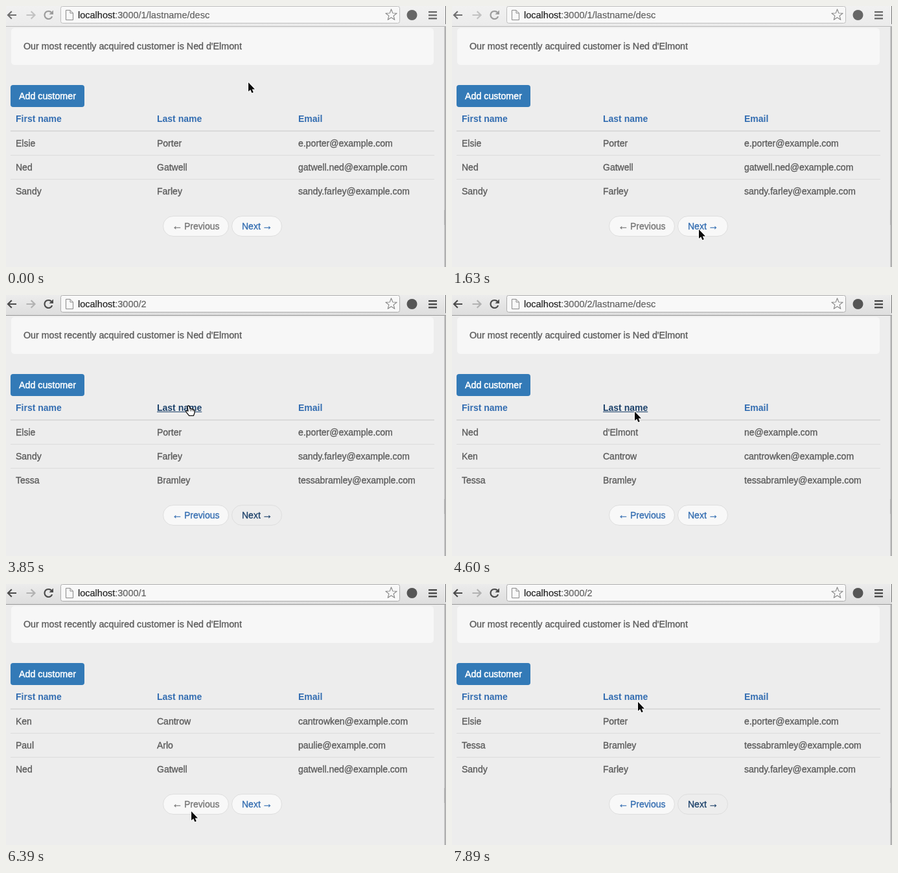
An HTML page with a canvas that plays this animation: 679x403 px, repeating every 8000 ms.

```html
<!DOCTYPE html>
<html lang="en">
<head>
<meta charset="utf-8">
<title>Customer list</title>
<style>
html, body { margin: 0; width: 100%; height: 100%; overflow: hidden; background: #ededed; }
canvas { display: block; width: 679px; height: 403px; }
</style>
</head>
<body>
<canvas id="stage"></canvas>
<script>
const W = 679, H = 403, LOOP = 8000;
const SANS = '"Liberation Sans", Arial, sans-serif';
const LINK = '#336db1', DARK = '#1d426b', BODY = '#5c5c5c';
const canvas = document.getElementById('stage');
const ctx = canvas.getContext('2d');
const ratio = window.devicePixelRatio || 1;
canvas.width = W * ratio;
canvas.height = H * ratio;

const people = [
  ['Elsie', 'Porter', 'e.porter@example.com'],
  ['Ned', 'Gatwell', 'gatwell.ned@example.com'],
  ['Sandy', 'Farley', 'sandy.farley@example.com'],
  ['Ned', "d'Elmont", 'ne@example.com'],
  ['Ken', 'Cantrow', 'cantrowken@example.com'],
  ['Tessa', 'Bramley', 'tessabramley@example.com'],
  ['Paul', 'Arlo', 'paulie@example.com']
];

const pages = [
  { at: 0, path: '/1/lastname/desc', rows: [0, 1, 2] },
  { at: 2970, path: '/2', rows: [0, 2, 5] },
  { at: 4150, path: '/2/lastname/desc', rows: [3, 4, 5] },
  { at: 5950, path: '/1', rows: [4, 6, 1] },
  { at: 7440, path: '/2', rows: [0, 5, 2] }
];

// Pointer moves: the pointer is redrawn `steps` times from start to end
const moves = [
  { start: 290, end: 1330, steps: 8, x: 379, y: 372 },
  { start: 1480, end: 1630, steps: 2, x: 381, y: 345 },
  { start: 2370, end: 2520, steps: 2, x: 379, y: 343 },
  { start: 3120, end: 3850, steps: 6, x: 282, y: 171 },
  { start: 4600, end: 5500, steps: 7, x: 287, y: 328 },
  { start: 5800, end: 5800, steps: 1, x: 288, y: 330 },
  { start: 6100, end: 6390, steps: 3, x: 286, y: 351 },
  { start: 6690, end: 7140, steps: 4, x: 386, y: 339 },
  { start: 7590, end: 7890, steps: 3, x: 287, y: 182 }
];

const handTimes = [[2370, 3120], [3850, 4600], [5800, 6100], [6990, 7590]];
const nextTimes = [[2370, 4000], [6990, LOOP]];
const prevTimes = [[5800, 5950]];
const nameTimes = [[3850, 5950]];

const arrowShape = new Path2D('M0 0V14L3.2 11.2L5.4 16.2L7.8 15.2L5.7 10.4H10Z');
const handShape = new Path2D('M-2 1Q-.5 -1 1 1L2.2 5Q3.6 3.6 4.8 5.4Q6.4 4.4 7.2 6.2Q9 6 9 8.2V11L7.4 15.4H0.6L-4.4 9.2Q-4.2 6.6 -1 8.2Z');

const during = (t, spans) => spans.some(([a, b]) => t >= a && t < b);

function pointerAt(t) {
  let x = 374, y = 118;
  for (const m of moves) {
    if (t < m.start) break;
    const gap = (m.end - m.start) / (m.steps - 1) || 1;
    const step = Math.min(m.steps, Math.floor((t - m.start) / gap + 1e-6) + 1);
    const p = step / m.steps;
    const ease = p * p * (3 - 2 * p);
    x += (m.x - x) * ease;
    y += (m.y - y) * ease;
  }
  return [Math.round(x), Math.round(y)];
}

// A thin outline gives the letters their heavier smoothing
function text(str, x, y, color, font = '14px', weight = 0.35) {
  ctx.font = `${font} ${SANS}`;
  ctx.fillStyle = ctx.strokeStyle = color;
  ctx.lineWidth = weight;
  ctx.lineJoin = 'round';
  ctx.fillText(str, x, y);
  if (weight) ctx.strokeText(str, x, y);
  return ctx.measureText(str).width;
}

function rect(x, y, w, h, color) {
  ctx.fillStyle = color;
  ctx.fillRect(x, y, w, h);
}

function box(x, y, w, h, r, fill, stroke) {
  ctx.beginPath();
  ctx.roundRect(x, y, w, h, r);
  ctx.fillStyle = fill;
  ctx.fill();
  if (stroke) line(stroke, 1);
}

function line(color, width, path) {
  ctx.strokeStyle = color;
  ctx.lineWidth = width;
  if (path) ctx.stroke(path);
  else ctx.stroke();
}

function navArrow(x, dir, color) {
  ctx.lineJoin = 'miter';
  ctx.beginPath();
  ctx.moveTo(x + dir, 14);
  ctx.lineTo(x + dir * 14, 14);
  ctx.moveTo(x + dir * 6.8, 8.2);
  ctx.lineTo(x + dir, 14);
  ctx.lineTo(x + dir * 6.8, 19.8);
  line(color, 2.2);
}

function reloadIcon(color) {
  ctx.beginPath();
  ctx.arc(65.5, 14, 6, 0.35, Math.PI * 1.78);
  line(color, 2.2);
  ctx.beginPath();
  ctx.moveTo(73, 6.5);
  ctx.lineTo(73, 13);
  ctx.lineTo(66.5, 13);
  ctx.fillStyle = color;
  ctx.fill();
}

function pageIcon() {
  ctx.beginPath();
  ctx.moveTo(92.5, 6.5);
  ctx.lineTo(99, 6.5);
  ctx.lineTo(103.5, 11);
  ctx.lineTo(103.5, 21.5);
  ctx.lineTo(92.5, 21.5);
  ctx.closePath();
  ctx.moveTo(99, 6.5);
  ctx.lineTo(99, 11);
  ctx.lineTo(103.5, 11);
  line('#8a8a8a', 1);
}

function star() {
  ctx.beginPath();
  for (let i = 0; i < 10; i++) {
    const a = i * Math.PI / 5 - Math.PI / 2;
    const r = i % 2 ? 3.8 : 9;
    ctx.lineTo(594.5 + r * Math.cos(a), 14 + r * Math.sin(a));
  }
  ctx.closePath();
  line('#858585', 1.1);
}

function toolbar(active, path) {
  const ink = active ? '#4c4c4c' : '#707070';
  const shade = ctx.createLinearGradient(0, 0, 0, 31);
  shade.addColorStop(0, active ? '#ececec' : '#f1f1f1');
  shade.addColorStop(1, active ? '#dedede' : '#ebebeb');
  rect(0, 0, W, 31, shade);
  rect(0, 31, W, 1, active ? '#989898' : '#b8b8b8');
  navArrow(2, 1, ink);
  navArrow(45.5, -1, active ? '#b2b2b2' : '#c2c2c2');
  reloadIcon(active ? ink : '#9c9c9c');
  box(84.5, 0.5, 523, 26, 3, '#f8f8f8', active ? '#acacac' : '#bdbdbd');
  pageIcon();
  const host = text('localhost', 111, 19, '#222', '14.5px', 0.2);
  text(':3000' + path, 111 + host, 19, '#606060', '14.5px', 0.2);
  star();
  ctx.beginPath();
  ctx.arc(626.5, 14, 8, 0, Math.PI * 2);
  ctx.fillStyle = active ? '#555' : '#666';
  ctx.fill();
  for (let i = 0; i < 3; i++) rect(652, 8 + i * 5, 13, 2.5, ink);
}

function windowEdge() {
  rect(676, 32, 1, H - 32, '#cfcfcf');
  rect(677, 32, 2, H - 32, '#b0b0b0');
  rect(676, 315, 1, 23, '#b4b4b4');
  rect(678, 0, 1, 28, '#777');
}

function table(rows, nameLit) {
  const cols = [15, 233, 451];
  ['First name', 'Last name', 'Email'].forEach((label, i) => {
    const lit = i === 1 && nameLit;
    const w = text(label, cols[i], 179, lit ? DARK : LINK, 'bold 14px', 0);
    if (lit) rect(cols[i], 180, w, 1, DARK);
  });
  rect(7, 192, 654, 2, '#dadada');
  rows.forEach((id, r) => {
    people[id].forEach((cell, c) => text(cell, cols[c], 217 + r * 37, BODY));
    if (r < 2) rect(7, 230 + r * 37, 654, 1, '#dcdcdc');
  });
}

function pill(x, w, label, labelX, arrow, arrowX, lit, enabled) {
  const color = !enabled ? '#757575' : lit ? DARK : LINK;
  box(x + 0.5, 324.5, w - 1, 31, 15.5, lit ? '#ededed' : '#f8f8f8', '#dedede');
  text(label, labelX, 345, color);
  text(arrow, arrowX, 345, color, '16px');
}

function pointer(t) {
  const hand = during(t, handTimes);
  const shape = hand ? handShape : arrowShape;
  const [x, y] = pointerAt(t);
  ctx.save();
  ctx.translate(x, y);
  ctx.lineJoin = 'round';
  if (hand) {
    ctx.fillStyle = '#fff';
    ctx.fill(shape);
    line('#111', 1.3, shape);
    ctx.beginPath();
    for (const fx of [2.2, 4.6, 7]) {
      ctx.moveTo(fx, 5.5);
      ctx.lineTo(fx + 0.4, 8.5);
    }
    line('#111', 0.8);
  } else {
    line('#fff', 2, shape);
    ctx.fillStyle = '#0a0a0a';
    ctx.fill(shape);
  }
  ctx.restore();
}

function draw(t) {
  const page = pages.filter(p => p.at <= t).pop();
  ctx.setTransform(ratio, 0, 0, ratio, 0, 0);
  rect(0, 0, W, H, '#ededed');
  box(8, 34, 652, 57, 5, '#f7f7f7');
  text("Our most recently acquired customer is Ned d'Elmont", 27, 67, BODY, '14.25px');
  box(7, 122, 114, 34, 4, '#337ab7');
  text('Add customer', 20, 144, '#fff', '14.25px', 0.5);
  table(page.rows, during(t, nameTimes));
  pill(242, 102, 'Previous', 275, '\u2190', 256.5, during(t, prevTimes), page.path[1] === '2');
  pill(348, 78, 'Next', 364, '\u2192', 395.5, during(t, nextTimes), true);
  toolbar(t >= 1930, page.path);
  windowEdge();
  pointer(t);
}

let began;
function tick(now) {
  began ??= now;
  draw((now - began) % LOOP);
  requestAnimationFrame(tick);
}
draw(0);
requestAnimationFrame(tick);
</script>
</body>
</html>
```
